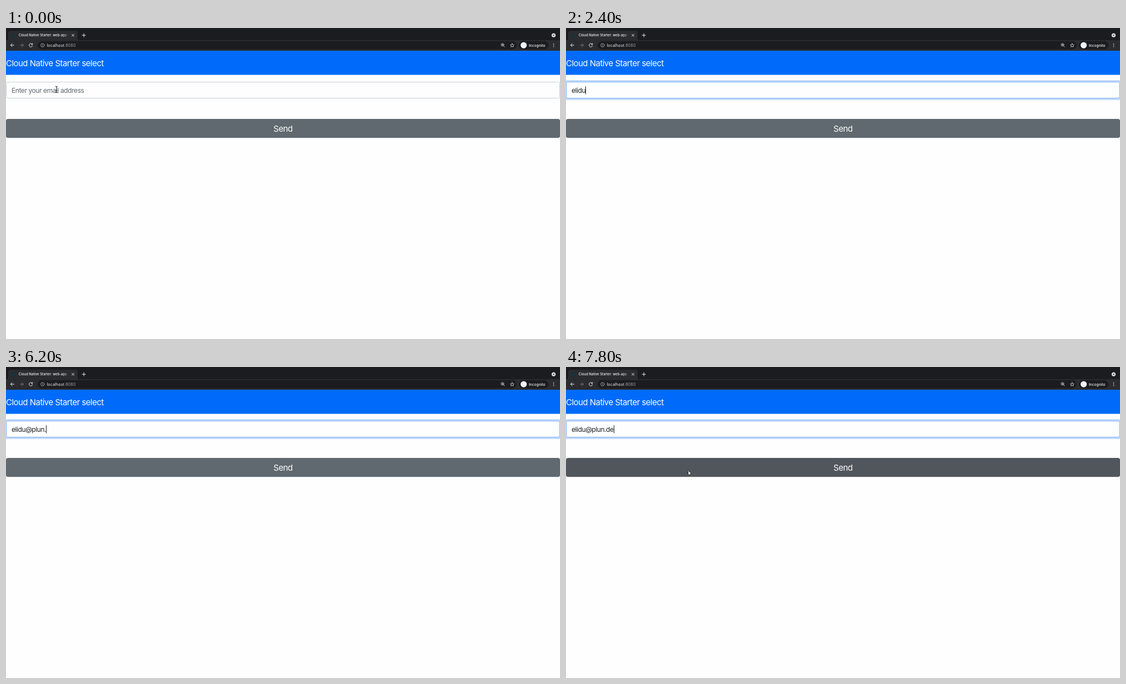
These frames come from a looping animation (998 by 561 pixels, 8000 ms). An HTML page:

```html
<!DOCTYPE html>
<html lang="en">
<head>
<meta charset="utf-8">
<title>Sign-in form</title>
<style>
  html, body { margin: 0; width: 100%; height: 100%; overflow: hidden; background: #fefefe; }
  svg { display: block; width: 100vw; height: 100vh; font-family: Inter, Roboto, sans-serif; }
  text { white-space: pre; }
  .page { letter-spacing: -.035em; }
  .line { fill: none; stroke-linecap: round; stroke-linejoin: round; }
</style>
</head>
<body>
<svg viewBox="0 0 998 561">
  <defs>
    <linearGradient id="fade" gradientUnits="userSpaceOnUse" x1="103" x2="113" y1="0" y2="0">
      <stop stop-color="#f1f1f2"/>
      <stop offset="1" stop-color="#f1f1f2" stop-opacity="0"/>
    </linearGradient>
  </defs>

  <!-- browser frame -->
  <rect width="998" height="23" fill="#1b1c1f"/>
  <rect y="22" width="998" height="19" fill="#2b2c2f"/>
  <path d="M0 22.5Q4 22.5 4 18.500V9Q4 5 8 5H125Q129 5 129 9V18.500Q129 22.500 133 22.500Z" fill="#2b2c2f"/>
  <circle cx="14.500" cy="13.300" r="3.500" fill="#17343f"/>
  <text x="22.800" y="15.300" font-size="6" font-weight="500" fill="url(#fade)">Cloud Native Starter: web-app-</text>
  <g class="line" stroke="#e8e9eb" stroke-width="1">
    <path d="M118.700 11.200l3.800 3.800m0-3.800l-3.800 3.800"/>
    <path d="M137.300 13.100h6m-3-3v6"/>
    <path d="M14.500 31h-6m2.800-2.900L8.400 31l2.900 2.900"/>
    <path d="M25.300 31h6m-2.800-2.900L31.400 31l-2.900 2.900" stroke="#77787b"/>
    <path d="M47.300 29.300A3.100 3.100 0 1 0 47.700 32M47.700 27.800v2h-2"/>
  </g>
  <circle cx="986.500" cy="13.200" r="3.600" fill="#d5d6d8"/>
  <path d="M984.800 12.500h3.400l-1.700 2z" fill="#1b1c1f"/>

  <rect x="57" y="23.800" width="863" height="14.600" rx="7.300" fill="#1b1c1f"/>
  <rect x="924" y="23.800" width="53" height="14.600" rx="7.300" fill="#1b1c1f"/>
  <g class="line" stroke="#b4b6b9" stroke-width=".8">
    <circle cx="65.800" cy="31.100" r="3.200"/>
    <path d="M65.800 30.900v1.700M65.800 29.300v.1"/>
  </g>
  <text x="73.400" y="33.600" font-size="7.200" letter-spacing=".1" fill="#a0a2a5"><tspan fill="#f1f1f2">localhost</tspan>:8080</text>
  <g class="line" stroke="#d5d6d8" stroke-width=".8">
    <circle cx="894.400" cy="30.300" r="2.500"/>
    <path d="M896.300 32.200l2 2M893.300 30.300h2.200m-1.100-1.100v2.200"/>
    <path d="M911.800 27.900l1 2.300 2.500.2-1.900 1.600.6 2.400-2.200-1.300-2.200 1.300.6-2.400-1.900-1.600 2.500-.2z"/>
  </g>
  <circle cx="932.600" cy="31.100" r="5.600" fill="#f4f4f5"/>
  <text x="942" y="33.500" font-size="6.600" font-weight="500" fill="#f1f1f2">Incognito</text>
  <g fill="#d5d6d8">
    <circle cx="986.500" cy="28.500" r=".8"/>
    <circle cx="986.500" cy="31.100" r=".8"/>
    <circle cx="986.500" cy="33.700" r=".8"/>
  </g>

  <!-- page -->
  <rect y="41" width="998" height="43.500" fill="#006bfb"/>
  <text class="page" x="0" y="69.200" font-size="15" fill="#fefefe">Cloud Native Starter select</text>
  <rect id="ring" x="-3" y="94" width="1004" height="36" rx="5.500" fill="#c1d9fb"/>
  <rect id="box" x=".5" y="97.500" width="997" height="29" rx="3" fill="#fefefe"/>
  <text id="field" class="page" x="10" y="116.700" font-size="12"></text>
  <rect id="caret" y="105" width="1" height="14.500" fill="#222"/>
  <rect id="button" y="164" width="998" height="34.200" rx="3.800"/>
  <text class="page" x="499" y="187.400" font-size="15" fill="#fefefe" text-anchor="middle">Send</text>

  <!-- pointers, each with its hot spot at 0,0 -->
  <g id="beam" class="line">
    <path d="M-2-5.500Q0-5.500 0-4Q0-5.500 2-5.500M0-4V5M-2 6.300Q0 6.300 0 5Q0 6.300 2 6.300M-1 1.800H1" stroke="#222" stroke-width=".9"/>
  </g>
  <path id="arrow" d="M0 0V8L1.800 6.400L3 9.200L4.300 8.600L3.100 5.900H5.500Z" fill="#111" stroke="#fff" stroke-width=".7"/>
  <path id="hand" d="M-1.300 3V-2.400Q-1.300-3.300-.5-3.300T.3-2.400V-.3L2.300 0Q3.500.2 3.400 1.500L2.800 4.500H-.7L-2.800 1.500Q-3.200.6-2.300.4Z" fill="#fff" stroke="#111" stroke-width=".7"/>
</svg>

<script>
const LOOP = 8000, STEP = 200;
const HINT = 'Enter your email address', ADDRESS = 'elidu@plun.de';

// moment at which each letter of the address appears
const keys = [1600, 1800, 2000, 2200, 2400, 3400, 4400, 4600, 5200, 5600, 6200, 6400, 6600];

// time, value: each value holds until the next entry
const focus = [[0, 0], [200, .6], [400, 1]];
const caretOn = [[0, 0], [200, 1], [800, 0], [1200, 1], [3000, 0], [3400, 1], [4000, 0],
  [4400, 1], [5000, 0], [5200, 1], [7200, 0], [7600, 1]];
const hover = [[0, 0], [7600, 1]];
const pointer = [
  [0, ['beam', 91, 110.500]],
  [400, ['beam', 90.300, 110.500]],
  [1600, ['', 0, 0]],
  [7200, ['arrow', 172, 68]],
  [7400, ['arrow', 208, 162.300]],
  [7600, ['hand', 220, 186.500]],
  [7800, ['hand', 221.300, 189.500]]
];

const el = id => document.getElementById(id);
const at = (track, t) => track.filter(([time]) => time <= t).pop()[1];
const set = (id, attrs) => {
  for (const name in attrs) el(id).setAttribute(name, attrs[name]);
};
const mix = (a, b, k) => `rgb(${a.map((v, i) => Math.round(v + (b[i] - v) * k))})`;

function draw(t) {
  const glow = at(focus, t);
  set('ring', { opacity: glow });
  set('box', { stroke: mix([200, 206, 214], [126, 178, 248], glow) });

  const typed = ADDRESS.slice(0, keys.filter(k => k <= t).length);
  const field = el('field');
  field.textContent = typed || HINT;
  set('field', { fill: typed ? '#1b1e21' : '#5f696f' });
  const end = typed ? field.getComputedTextLength() : 0;
  set('caret', { x: Math.round(10 + end), opacity: at(caretOn, t) });

  set('button', { fill: at(hover, t) ? '#50565b' : '#5f696f' });

  const [shape, x, y] = at(pointer, t);
  for (const id of ['beam', 'arrow', 'hand']) {
    set(id, { visibility: id === shape ? 'visible' : 'hidden', transform: `translate(${x} ${y})` });
  }
}

let last = -1;
function tick() {
  const t = Math.floor(performance.now() % LOOP / STEP) * STEP;
  if (t !== last) draw(last = t);
  requestAnimationFrame(tick);
}
tick();
</script>
</body>
</html>
```
